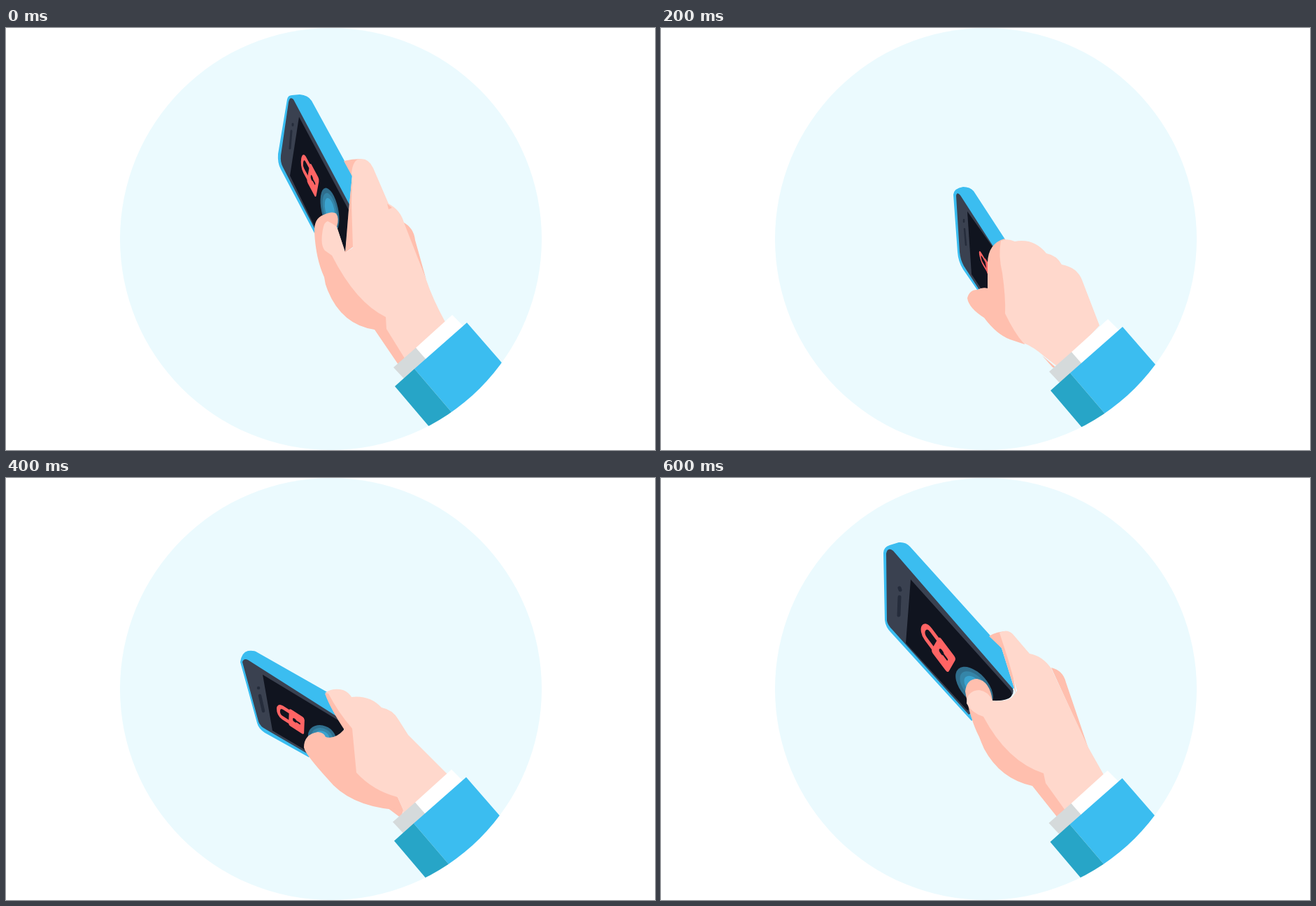
An HTML page with a canvas for the animation above (700 ms loop, 928x603 px).

```html
<!DOCTYPE html>
<html lang="en">
<head>
<meta charset="utf-8">
<title>Hand unlocking a phone</title>
<style>
html, body { margin: 0; width: 100%; height: 100%; overflow: hidden; background: #fff; }
canvas { display: block; }
</style>
</head>
<body>
<canvas width="928" height="603"></canvas>
<script>
const ctx = document.querySelector('canvas').getContext('2d');
const BLUE = '#3bbdf0', RED = '#ff6464', SCREEN = '#10141f', SKIN = '#ffd8cc', SHADE = '#ffbfae';
const RINGS = [['#2f6e8d', 1], ['#3585a8', .77], ['#3ba3cf', .54]];
const STEP = 100;

// lock: matrix from the unit square to the lock body; ring: x, y, rx, ry, degrees
// shade is painted under skin; sleeve is the offset of the cuff and sleeve
const poses = [
  {
    sleeve: [0, -6],
    body: 'M402,102Q403,96 409,96L420,95Q432,96 437,104L495,210 485,320 441,293 393,202Q388,193 389,180Z',
    face: 'M404,106Q406,97 411,102L492,254 485,321 442,288 396,199Q392,192 393,182Z',
    screen: 'M419,127L490,260 485,321 441,283 406,211Z',
    speaker: ['M410,137v2M408,147L406,172', 3],
    lock: [13, 24, -5, 27, 435, 192],
    ring: [463, 260, 12, 32, -12],
    shade: 'M483,190Q495,187 508,187L500,230 495,212ZM495,212L490,260 485,321 496,313 500,230Z' +
      'M441,292Q440,272 454,267Q466,261 472,265Q477,272 473,284L485,320 560,400 600,470 561,481 527,431Q480,424 460,375Q456,366 455,356Q443,330 441,292' +
      'M567,277Q583,285 585,303L601,360Z',
    skin: 'M494,208Q496,186 508,187Q519,187 525,200L547,251Q564,260 569,278L601,360Q610,387 628,420L570,472 544,430 543,413Q500,392 466,325L456,318Q449,310 453,288Q455,277 460,276Q468,280 473,284L485,321 496,314 494,250 495,212Z',
    fold: 'M545,251L552,257 547,259Z'
  },
  {
    sleeve: [0, 0],
    body: 'M440,152Q440,146 447,146L458,145Q468,146 471,154L509,262 500,300 470,330 466,329 444,270Q440,258 440,245Z',
    face: 'M443,154Q444,147 448,155L496,285 490,330 469,328 446,266Q443,258 443,246Z',
    screen: 'M454,179L495,290 488,328 472,328 453,275Z',
    speaker: ['M449,190v9M450,205V233', 2],
    lock: [9, 30, 0, 30, 467, 250],
    ring: [485, 312, 6, 22, -6],
    shade: 'M468,328Q478,325 488,328L490,300Q497,265 514,254L530,260 515,370 522,420 497,405Q483,395 471,370Q452,352 452,342Q454,332 468,328',
    skin: 'M458,334Q470,326 487,328L486,346Q468,344 458,334' +
      'M513,255Q520,248 530,248Q542,252 541,273Q565,275 576,297Q590,303 595,318Q614,324 618,345L629,408 635,420 568,480 541,438Q527,423 518,417Q495,380 500,357Q508,345 506,320Q503,290 513,265Z',
    fold: 'M538,434L571,484 566,480Z'
  },
  {
    sleeve: [1, 0],
    body: 'M418,238Q419,229 432,227Q442,227 447,233L492,302 470,375 452,374 432,345Q425,334 424,320Z',
    face: 'M422,240Q423,233 428,239L475,312 470,374 455,374 433,340Q428,331 427,320Z',
    screen: 'M438,262L475,314 468,374 458,373 444,352Z',
    speaker: ['M433,274v3M434,287L436,310', 2.5],
    lock: [12, 20, 3, 22, 463, 328],
    shade: 'M452,374Q460,370 467,372L467,335Q468,308 491,301L500,310 500,400 520,452 499,445Q480,438 462,414Q440,400 438,386Q441,374 452,374',
    skin: 'M486,304Q495,300 506,305Q533,300 551,322Q566,325 573,338Q595,342 602,360L627,425 570,486 549,470Q532,455 518,450Q505,435 492,408Q493,385 488,350Q482,325 486,304',
    fold: 'M545,468L568,488 560,485Z'
  },
  {
    sleeve: [1, 0],
    body: 'M381,294Q383,285 396,285Q405,285 411,289L462,324 455,400 432,405 408,389Q401,384 399,375Z',
    face: 'M385,296Q386,291 392,294L456,337 455,395 434,402 412,386Q404,381 402,373Z',
    screen: 'M404,309L455,341 458,390 438,402 421,389Z',
    speaker: ['M400,322v2M402,333L407,355', 3],
    lock: [20, 17, 4, 22, 436, 351],
    shade: 'M432,405Q435,394 450,391Q457,392 459,389Q455,370 451,352Q449,322 470,317L480,330 490,400 524,461 496,457Q480,452 459,432Q436,425 432,412Z',
    skin: 'M464,320Q472,315 484,319Q510,309 532,327Q548,327 557,340Q580,340 589,357L622,414 632,423 566,483 552,473Q540,463 520,460Q498,440 481,412Q482,400 482,393Q478,385 470,370Q463,345 464,320',
    fold: 'M549,471L566,483 562,484Z'
  },
  {
    sleeve: [-1, .5],
    body: 'M335,263Q337,249 346,247Q355,246 359,249L470,312 482,358 433,399 370,364Q361,358 359,350Z',
    face: 'M338,263Q340,257 346,260L483,347 482,362 470,372 433,395 373,360Q363,355 361,348Z',
    screen: 'M367,281L483,351V360Q480,368 470,372L435,393 381,361Z',
    speaker: ['M361,300h.1M363,311L368,333', 4.5],
    lock: [22, 14, -1, 24, 405, 329],
    ring: [452, 371, 21, 17, 30],
    shade: 'M456,308L470,303 496,358 484,360Q464,330 456,308' +
      'M426,385Q426,366 446,363Q455,364 457,370Q470,374 483,360L495,355 510,425 560,456 568,474 555,474Q490,468 460,430Q428,395 426,385',
    skin: 'M456,307Q468,299 482,303Q490,306 494,313Q520,310 537,328Q553,331 561,345L575,367 632,424 568,484 567,472 560,456Q525,447 501,421L495,358Q475,335 461,308Z',
    fold: 'M545,471L568,474 565,486Z'
  },
  {
    sleeve: [.5, 2],
    body: 'M232,215Q235,199 250,197Q261,196 267,199L437,297 476,350 429,406 283,325Q270,317 266,306Z',
    face: 'M236,218Q237,209 246,212L470,341Q480,350 474,360Q462,372 447,374L427,399 283,320Q273,314 269,306Z',
    screen: 'M282,240L470,347Q479,352 474,360Q462,372 447,374L424,398 302,331Z',
    speaker: ['M270,258l3,3M275,270L282,294', 6],
    lock: [33, 18, -4, 26, 345, 306],
    ring: [418, 361, 34, 20, 30],
    shade: 'M416,287Q425,275 440,273L450,285 474,340 437,297Z' +
      'M407,362Q412,350 425,351Q438,354 450,374L460,400 550,450 560,470Q520,477 490,466Q460,455 449,431Q440,424 430,408Q408,380 407,362' +
      'M517,304Q532,305 540,315L605,403Z',
    skin: 'M431,281Q440,270 457,277L481,294Q503,292 519,306L600,398 610,408 633,424 568,483 557,470 560,466 551,451Q485,440 443,399Q425,400 415,383Q416,370 425,366Q436,363 450,374Q470,370 476,357L474,346 437,297Z',
    fold: 'M543,472L555,470 570,482 566,487Z'
  },
  {
    sleeve: [.5, 2],
    body: 'M318,107Q318,99 327,96L340,92Q350,91 356,98L487,243 505,300 444,347 329,221Q321,213 320,203Z',
    face: 'M322,108Q324,98 332,104L503,301Q506,308 498,314Q487,319 473,318L440,338 331,217Q324,210 323,204Z',
    screen: 'M357,145L500,304Q504,312 497,315Q487,319 473,318L438,332 350,236Z',
    speaker: ['M341,157l1,3M341,170L340,196', 5],
    lock: [24, 32, -12, 21, 398, 226],
    ring: [448, 298, 34, 19, 48],
    shade: 'M469,226Q480,219 495,219L500,260 508,310 487,243Z' +
      'M435,305Q437,287 452,287Q470,290 474,318L520,400 550,420 600,470 566,484 531,440Q485,430 462,387Q458,378 455,370Q442,345 435,305' +
      'M558,271Q575,275 579,292L612,389Z',
    skin: 'M484,221Q495,215 503,223L527,251Q545,254 558,272L611,385 633,424 578,475 550,436 547,422Q495,405 461,341Q443,335 437,322Q437,304 455,303Q468,305 474,318Q498,320 504,311L509,304 496,258Z',
    fold: ''
  }
];

function fill(color, path) {
  ctx.fillStyle = color;
  ctx.fill(new Path2D(path));
}

function stroke(color, path, width) {
  ctx.strokeStyle = color;
  ctx.lineWidth = width;
  ctx.lineCap = 'round';
  ctx.stroke(new Path2D(path));
}

function drawRings([x, y, rx, ry, degrees]) {
  for (const [color, scale] of RINGS) {
    ctx.fillStyle = color;
    ctx.beginPath();
    ctx.ellipse(x, y, rx * scale, ry * scale, degrees * Math.PI / 180, 0, 7);
    ctx.fill();
  }
}

function drawLock(matrix) {
  ctx.save();
  ctx.transform(...matrix);
  stroke(RED, 'M.1,.2H-.4C-.78,.2 -.78,.8 -.4,.8H.1', .22);
  ctx.fillStyle = RED;
  ctx.beginPath();
  ctx.roundRect(0, 0, 1, 1, .13);
  ctx.fill();
  stroke(SCREEN, 'M.35,.5H.7', .1);
  stroke(SCREEN, 'M.35,.5H.4', .2);
  ctx.restore();
}

function drawPhone(pose) {
  fill(BLUE, pose.body);
  fill('#3a4150', pose.face);
  fill(SCREEN, pose.screen);
  stroke('#252c3b', ...pose.speaker);
  ctx.save();
  ctx.clip(new Path2D(pose.screen));
  if (pose.ring) drawRings(pose.ring);
  drawLock(pose.lock);
  ctx.restore();
}

function drawSleeve([dx, dy]) {
  ctx.save();
  ctx.translate(dx, dy);
  fill('#fff', 'M586,463L638,416 655,433 600,482Z');
  fill('#d5dadb', 'M554,491L586,463 601,480 569,507Z');
  fill(BLUE, 'M584,493L659,427 740,520 650,570Z');
  fill('#27a5c7', 'M556,518L584,493 650,570 613,585Z');
  ctx.restore();
}

function draw(time) {
  const pose = poses[Math.floor(time / STEP) % poses.length];
  ctx.clearRect(0, 0, 928, 603);
  ctx.save();
  ctx.beginPath();
  ctx.arc(464.5, 301.5, 301.5, 0, 7);
  ctx.fillStyle = '#ebfafe';
  ctx.fill();
  ctx.clip();
  drawPhone(pose);
  fill(SHADE, pose.shade);
  fill(SKIN, pose.skin);
  fill(SHADE, pose.fold);
  drawSleeve(pose.sleeve);
  ctx.restore();
}

const start = performance.now();
function tick() {
  draw(performance.now() - start);
  requestAnimationFrame(tick);
}
tick();
</script>
</body>
</html>
```
